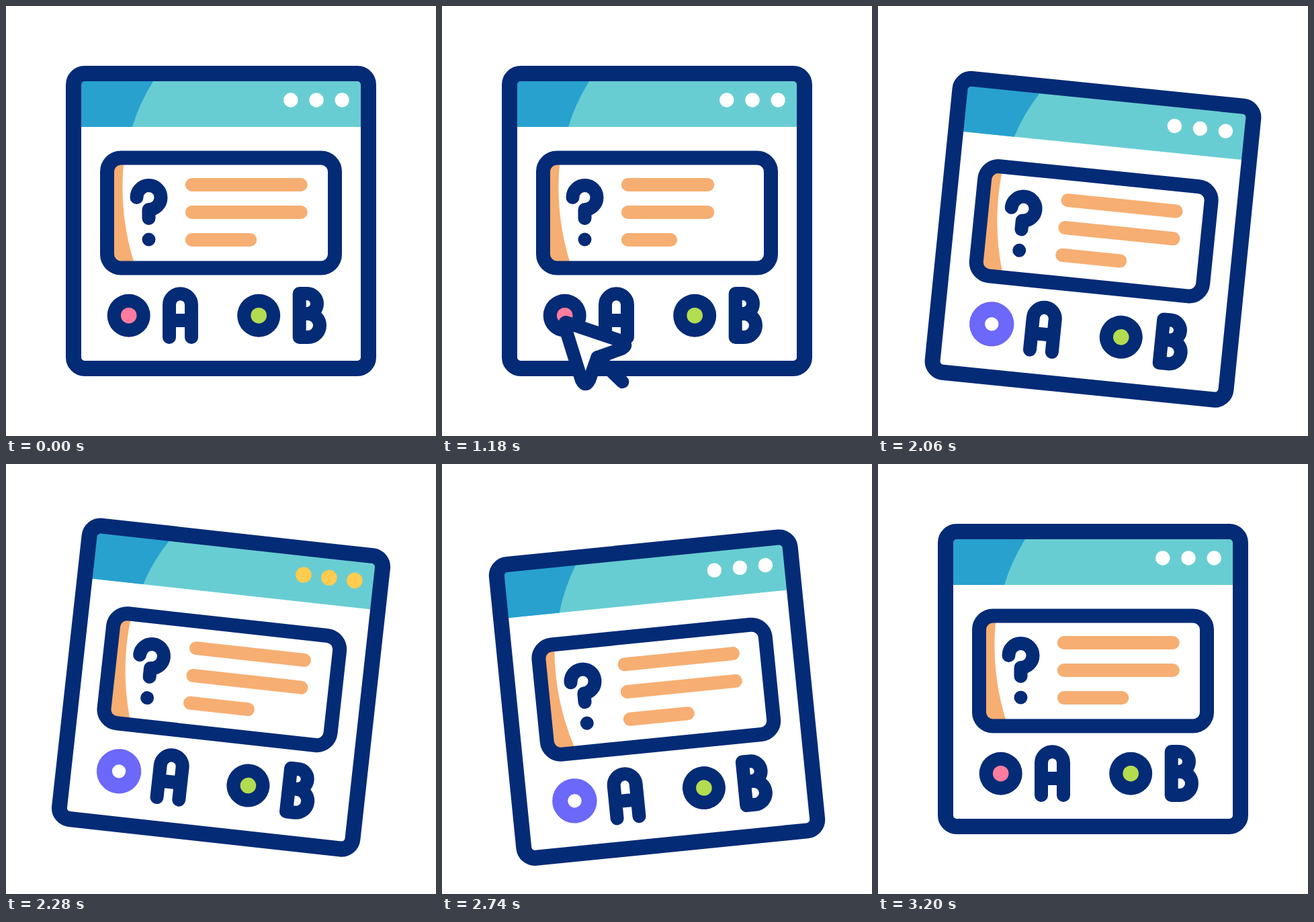
Animation of 640x640 px, one loop 3300 ms. Source, as an HTML page:

```html
<!DOCTYPE html>
<html lang="en">
<head>
<meta charset="utf-8">
<title>Quiz window</title>
<style>
  html, body { margin: 0; width: 100%; height: 100%; overflow: hidden; background: #fff; }
  svg { display: block; width: 100vw; height: 100vh; }
  .ink { fill: none; stroke: #042b76; stroke-width: 20; stroke-linecap: round; stroke-linejoin: round; }
  .line { fill: none; stroke: #f6ae72; stroke-width: 20; stroke-linecap: round; }
  #rays { stroke: #ffcc4f; stroke-width: 20; stroke-linecap: round; }
</style>
</head>
<body>
<svg viewBox="0 0 640 640">
  <g id="win">
    <rect x="100" y="100" width="440" height="440" rx="17" fill="#fff"/>
    <path d="M108 108H532V180H108Z" fill="#68cdd2"/>
    <path d="M108 108H221L219 112Q198 146 188 180H108Z" fill="#28a1cf"/>
    <rect class="ink" x="100.5" y="100.5" width="439" height="439" rx="16.5" style="stroke-width:23"/>
    <g id="dots">
      <circle cx="423.8" cy="140"/>
      <circle cx="462" cy="140"/>
      <circle cx="500.2" cy="140"/>
    </g>
    <path d="M155 232H176L175 236Q168.500 310 190 380L191 385H155Z" fill="#f6ae72"/>
    <rect class="ink" x="150.500" y="226" width="339" height="164" rx="20.500" style="stroke-width:21"/>
    <path class="line" data-y="266" data-len="162"/>
    <path class="line" data-y="307" data-len="162"/>
    <path class="line" data-y="348" data-len="86.500"/>
    <circle id="ring" cx="182.700" cy="460.700"/>
    <circle id="core" cx="182.700" cy="460.700"/>
    <circle cx="376.200" cy="460.700" r="32" fill="#042b76"/>
    <circle cx="376.200" cy="460.700" r="11.800" fill="#b3dc50"/>
    <path class="ink" d="M243 493V444.700a16.500 16.500 0 0 1 33 0V493M243 468H276"/>
    <path class="ink" d="M436.700 428H448a15 15 0 0 1 0 30H436.700H449.500a17.500 17.500 0 0 1 0 35H436.700Z"/>
    <g id="mark">
      <path class="ink" d="M194.500 285a18 18 0 1 1 18 18V316"/>
      <circle cx="212.500" cy="347.500" r="10" fill="#042b76"/>
    </g>
  </g>
  <g id="rays"></g>
  <g id="cursor">
    <path class="ink" d="M200 533L283 561Q295 567 283 573L247 586L235 620Q229 632 223 620L199 543Q196 532 200 533Z" style="fill:#fff"/>
    <path class="ink" d="M247 586L285 623"/>
  </g>
</svg>
<script>
const LOOP = 3300;
const $ = id => document.getElementById(id);
const lerp = (a, b, k) => a + (b - a) * k;

// Eased progress from time a to time b
function ease(t, a, b) {
  const p = Math.min(1, Math.max(0, (t - a) / (b - a)));
  return p * p * (3 - 2 * p);
}
// Rise from a to m, fall from m to b
const bump = (t, a, m, b) => ease(t, a, m) - ease(t, m, b);

const set = (el, attrs) => {
  for (const name in attrs) el.setAttribute(name, attrs[name]);
};

const lines = [...document.querySelectorAll(".line")];
const dots = [...$("dots").children];

// Each ray: inner end, outer end
const rays = [
  [143, 427, 119.500, 390],
  [139, 459, 87, 444],
  [120, 486, 88, 503]
].map(ends => {
  const el = document.createElementNS("http://www.w3.org/2000/svg", "line");
  $("rays").append(el);
  return { el, ends };
});

function drawMark(t) {
  const k = bump(t, 0, 280, 560);
  const x = lerp(212.500, 284, k), y = lerp(307, 284, k);
  const turn = 360 * ease(t, 0, 560);
  set($("mark"), {
    transform: `translate(${x} ${y}) rotate(${turn}) scale(${1 + 2.350 * k}) translate(-212.500 -307)`
  });
}

function drawLines(t) {
  const k = 1 - bump(t, 600, 950, 1300);
  for (const el of lines) {
    const { y, len } = el.dataset;
    set(el, { d: `M276.800 ${y}h${len * k}`, opacity: k > 0.002 ? 1 : 0 });
  }
}

function drawDots(t) {
  const lit = t > 1390 && t < 3190 && Math.floor((t - 1390) / 400) % 2 === 0;
  const r = lerp(lit ? 11.800 : 10.700, 27, bump(t, 1200, 1400, 1600));
  for (const el of dots) set(el, { r, fill: lit ? "#ffcc4f" : "#fff" });
}

function drawChoice(t) {
  const on = t > 1250 && t < 3010;
  set($("ring"), { r: on ? 33.200 : 32, fill: on ? "#6b68fa" : "#042b76" });
  set($("core"), { r: on ? 10.200 : 11.800, fill: on ? "#fff" : "#ff7c9e" });
}

function drawRays(t) {
  const from = ease(t, 1600, 1800), to = ease(t, 1260, 1500);
  for (const { el, ends: [x1, y1, x2, y2] } of rays) {
    set(el, {
      x1: lerp(x1, x2, from), y1: lerp(y1, y2, from),
      x2: lerp(x1, x2, to), y2: lerp(y1, y2, to),
      opacity: to > from ? 1 : 0
    });
  }
}

function drawCursor(t) {
  const come = 1 - ease(t, 700, 1160), go = ease(t, 1600, 2000);
  const x = -15 + 344 * come + 69 * go;
  const y = -62 + 287 * (come + go);
  const press = 1 - 0.120 * bump(t, 1160, 1250, 1340);
  set($("cursor"), {
    transform: `translate(${x + 200} ${y + 533}) scale(${press}) translate(-200 -533)`
  });
}

function drawWindow(t) {
  const tilt = 8 * (ease(t, 1800, 2200) - 2 * ease(t, 2200, 2600) + ease(t, 2600, 3000));
  let drop = 0;
  for (const a of [1800, 2200, 2600]) drop += 35 * bump(t, a, a + 200, a + 400);
  set($("win"), { transform: `translate(0 ${drop}) rotate(${tilt} 320 320)` });
}

function frame() {
  const t = performance.now() % LOOP;
  for (const draw of [drawMark, drawLines, drawDots, drawChoice, drawRays, drawCursor, drawWindow]) draw(t);
  requestAnimationFrame(frame);
}
frame();
</script>
</body>
</html>
```
